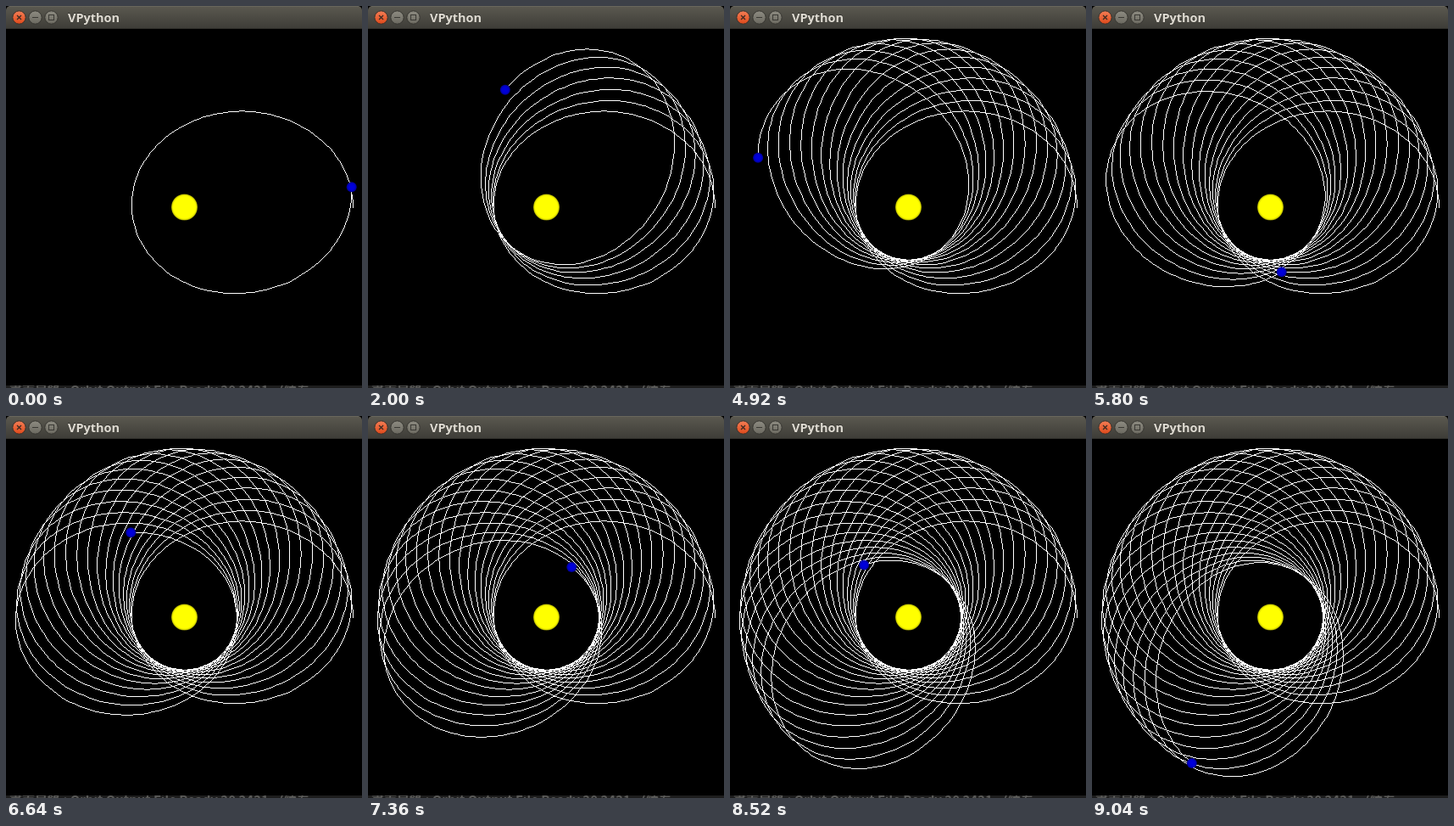
Recreate the animation shown at these times as an HTML page with a canvas. Size 420 px wide and 450 px high, loop 9060 ms.

```html
<!DOCTYPE html>
<html lang="en">
<head>
<meta charset="utf-8">
<title>VPython</title>
<style>
html, body { margin: 0; width: 100%; height: 100%; overflow: hidden; background: #000; }
canvas { position: absolute; left: 0; top: 0; width: 420px; height: 450px; }
#title {
  position: absolute; left: 73px; top: 4px; line-height: 20px;
  font: bold 14.5px/20px "Open Sans", "Noto Sans", sans-serif;
  color: #dfdbd2; text-shadow: 0 -1px 0 #33322e; white-space: nowrap;
}
</style>
</head>
<body>
<canvas id="stage" width="420" height="450"></canvas>
<div id="title">VPython</div>
<script>
const W = 420, H = 450, TAU = Math.PI * 2;
const LOOP = 9060, STEP = 40;
const BAR = 27, FLOOR = 447;
const SUN = { x: 210.5, y: 237, r: 15.5 };

// Precessing ellipse with the sun in one focus, starting at the far point
const FAR = 199, NEAR = 62;
const A = (FAR + NEAR) / 2, B = Math.sqrt(FAR * NEAR), ECC = (FAR - NEAR) / (FAR + NEAR);
const ADVANCE = 370.1 / 360;

// Mean anomaly in degrees at given simulation ticks
const PACE = [[0, 351.5], [50, 2265.7], [94, 3962], [123, 5092], [166, 6710], [200, 7994], [226, 8971.6]];

const ctx = document.getElementById('stage').getContext('2d');
const chrome = document.createElement('canvas');
chrome.width = W;
chrome.height = H;

function meanAnomaly(tick) {
  let i = 1;
  while (i < PACE.length - 1 && tick > PACE[i][0]) i++;
  const [t0, m0] = PACE[i - 1], [t1, m1] = PACE[i];
  return (m0 + (m1 - m0) * (tick - t0) / (t1 - t0)) * TAU / 360;
}

function eccentricAnomaly(m) {
  const base = Math.round(m / TAU) * TAU, rest = m - base;
  let lo = -Math.PI, hi = Math.PI;
  for (let i = 0; i < 40; i++) {
    const mid = (lo + hi) / 2;
    if (mid + ECC * Math.sin(mid) < rest) lo = mid; else hi = mid;
  }
  return base + (lo + hi) / 2;
}

function place(E) {
  const turns = Math.round(E / TAU) * TAU;
  const psi = turns + Math.atan2(B * Math.sin(E), A * (Math.cos(E) + ECC));
  const r = A * (1 + ECC * Math.cos(E)), angle = psi * ADVANCE;
  return [SUN.x + r * Math.cos(angle), SUN.y - r * Math.sin(angle)];
}

// Crisp one-pixel line
function line(px, [x0, y0], [x1, y1]) {
  x0 = Math.floor(x0); y0 = Math.floor(y0);
  x1 = Math.floor(x1); y1 = Math.floor(y1);
  const n = Math.max(Math.abs(x1 - x0), Math.abs(y1 - y0), 1);
  for (let i = 0; i <= n; i++) {
    const x = Math.round(x0 + (x1 - x0) * i / n);
    const y = Math.round(y0 + (y1 - y0) * i / n);
    px[y * W + x] = 0xffffffff;
  }
}

function disc(g, x, y, r, fill, stroke) {
  g.beginPath();
  g.arc(x, y, r, 0, TAU);
  g.fillStyle = fill;
  g.fill();
  if (stroke) {
    g.strokeStyle = stroke;
    g.stroke();
  }
}

function ball(x, y, r, stops) {
  const shade = ctx.createRadialGradient(x, y, 0, x, y, r);
  stops.forEach(([at, color]) => shade.addColorStop(at, color));
  disc(ctx, x, y, r, shade);
}

function vertical(g, y0, y1, top, bottom) {
  const shade = g.createLinearGradient(0, y0, 0, y1);
  shade.addColorStop(0, top);
  shade.addColorStop(1, bottom);
  return shade;
}

function drawChrome(g) {
  g.fillStyle = '#000';
  g.fillRect(0, 0, W, H);
  g.fillStyle = vertical(g, 0, BAR, '#5b5950', '#3d3c37');
  g.beginPath();
  g.roundRect(0, 0, W, BAR, [5, 5, 0, 0]);
  g.fill();
  g.fillStyle = '#68665c';
  g.fillRect(4, 0, W - 8, 1);
  g.fillStyle = '#32312d';
  g.fillRect(0, BAR - 1, W, 1);

  g.lineWidth = 1;
  disc(g, 15.5, 13.5, 7.7, vertical(g, 6, 21, '#f37d55', '#df4a1b'), '#35302b');
  for (const x of [34.5, 53.5])
    disc(g, x, 13.5, 7.7, vertical(g, 6, 21, '#8d8b81', '#6b6960'), '#35342f');

  g.strokeStyle = '#3b2a22';
  g.lineWidth = 1.3;
  g.beginPath();
  g.moveTo(13, 11); g.lineTo(18, 16);
  g.moveTo(18, 11); g.lineTo(13, 16);
  g.stroke();
  g.lineWidth = 1;
  g.strokeStyle = '#3a3934';
  g.beginPath();
  g.moveTo(31, 13.5); g.lineTo(38, 13.5);
  g.stroke();
  g.strokeRect(50.5, 10.5, 6, 6);

  // Sliver of the window behind
  g.save();
  g.beginPath();
  g.rect(0, FLOOR, W, H - FLOOR);
  g.clip();
  g.fillStyle = '#1d1d1d';
  g.fillRect(0, FLOOR, W, H - FLOOR);
  g.fillStyle = '#5a5a58';
  g.font = 'bold 15px "Noto Sans CJK TC", "Noto Sans CJK", "Noto Sans", sans-serif';
  g.fillText('畫面目錄 : Orbit Output File Ready 20 2421 - (續看', 4, 458);
  g.restore();
}

function draw(tick) {
  const E = eccentricAnomaly(meanAnomaly(tick));
  ctx.drawImage(chrome, 0, 0);

  const img = ctx.getImageData(0, 0, W, H);
  const px = new Uint32Array(img.data.buffer);
  let last = place(0);
  for (let e = 0.05; e < E; e += 0.05) {
    const next = place(e);
    line(px, last, next);
    last = next;
  }
  const planet = place(E);
  line(px, last, planet);
  ctx.putImageData(img, 0, 0);

  ball(SUN.x, SUN.y, SUN.r, [[0, '#ffff00'], [0.84, '#ffff00'], [0.94, '#d8d800'], [1, '#8c8c00']]);
  ball(planet[0], planet[1], 6, [[0, '#0000e0'], [0.6, '#0000d4'], [1, '#000090']]);
}

drawChrome(chrome.getContext('2d'));
const start = performance.now();
let shown = -1;

function frame() {
  const tick = Math.floor(((performance.now() - start) % LOOP) / STEP);
  if (tick !== shown) {
    shown = tick;
    draw(tick);
  }
  requestAnimationFrame(frame);
}
frame();
</script>
</body>
</html>
```
